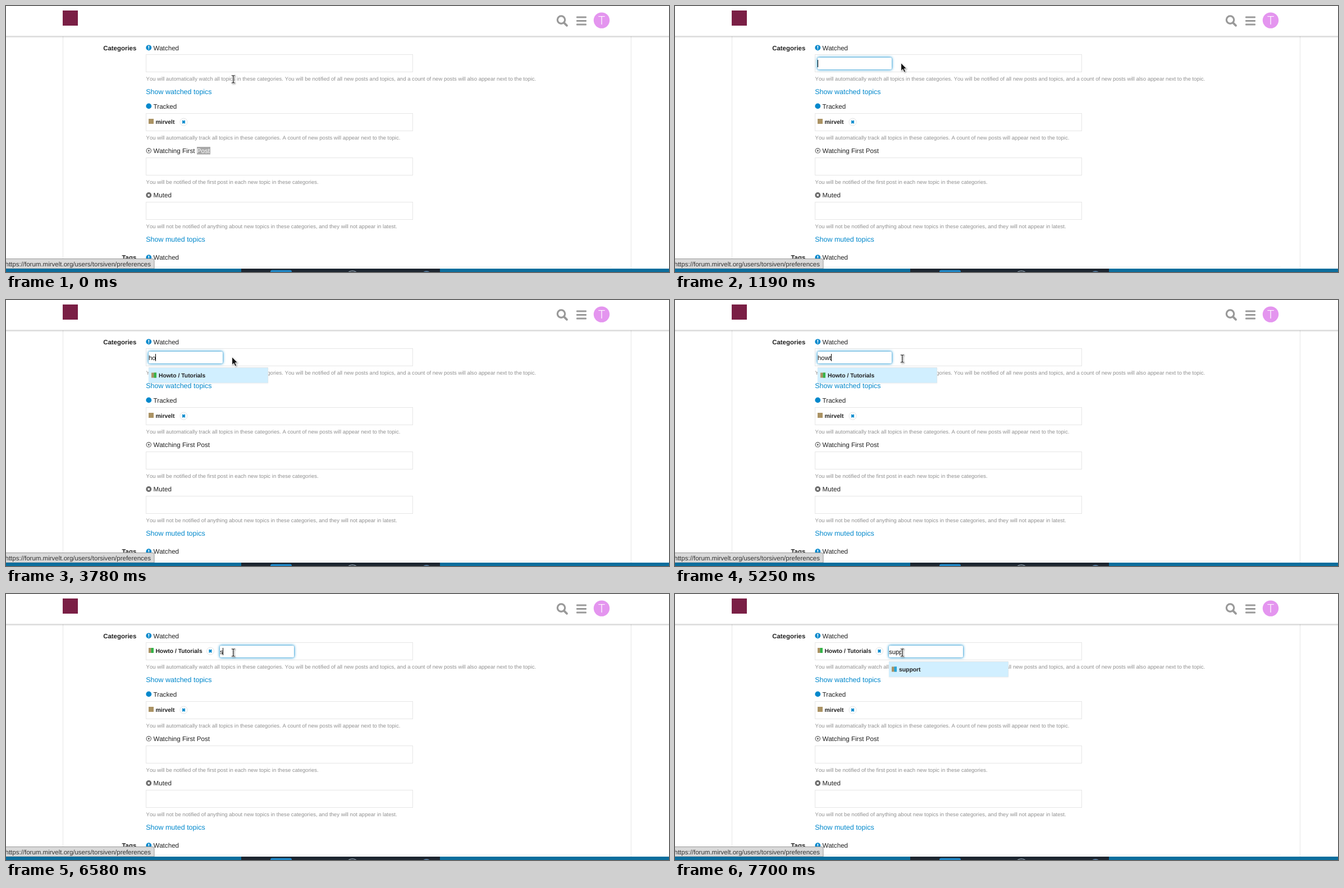
Recreate the animation shown at these times as an HTML page. Size 1181 by 474 pixels, loop 8 s.

```html
<!DOCTYPE html>
<html lang="en">
<head>
<meta charset="utf-8">
<title>Category preferences</title>
<style>
  html, body { margin: 0; width: 100%; height: 100%; overflow: hidden; background: #fff; }
  svg { display: block; width: 1181px; height: 474px; }
  text { font-family: "Liberation Sans", Arial, sans-serif; text-rendering: geometricPrecision; fill: #222; white-space: pre; }
  .label { font-size: 11.65px; }
  .head { font-size: 11.45px; font-weight: bold; text-anchor: end; }
  .hint { font-size: 9.57px; font-kerning: none; fill: #919191; }
  .link { font-size: 12.5px; fill: #08c; }
  .tag { font-size: 10.36px; font-weight: bold; }
  .typed { font-size: 11.4px; fill: #111; }
  .url { font-size: 11.5px; fill: #333; }
  .box { fill: #fff; stroke: #e6e6e6; }
  .focus { fill: #fff; filter: drop-shadow(0 0 1px rgba(0,136,204,.4)) drop-shadow(0 0 2.7px #08c); }
  .list { fill: #fff; stroke: #dfe3e5; filter: drop-shadow(0 1px 1px rgba(0,0,0,.06)); }
  .bar { fill: #fff; filter: drop-shadow(0 1.5px 1.5px rgba(0,0,0,.3)); }
</style>
</head>
<body>
<svg viewBox="0 0 1181 474"><g id="page"></g><g id="live"></g><g id="frame"></g><g id="mouse"></g></svg>
<script>
const $ = id => document.getElementById(id);
const TAN = '#ab9364', GREEN = '#35b44a', BLUE = '#25a5dc';

const rect = (x, y, w, h, fill, more = '') => `<rect x="${x}" y="${y}" width="${w}" height="${h}" fill="${fill}" ${more}/>`;
const styled = (cls, x, y, w, h, r = 0) => `<rect class="${cls}" x="${x}" y="${y}" width="${w}" height="${h}" rx="${r}"/>`;
const circle = (x, y, r, fill, more = '') => `<circle cx="${x}" cy="${y}" r="${r}" fill="${fill}" ${more}/>`;
const text = (cls, x, y, s, more = '') => `<text class="${cls}" x="${x}" y="${y}" ${more}>${s}</text>`;
const cross = (x, y, r, color, w) =>
  `<path d="M${x - r} ${y - r}l${2 * r} ${2 * r}m0 ${-2 * r}l${-2 * r} ${2 * r}" stroke="${color}" stroke-width="${w}"/>`;
const swatch = (x, y, color) => rect(x, y, 9, 9, TAN) + rect(x + 4.5, y, 4.5, 9, color);
const alertIcon = y => circle(254.3, y, 4.9, '#08c') + rect(253.5, y - 3.3, 1.7, 3.9, '#fff') + rect(253.5, y + 1.5, 1.7, 1.6, '#fff');
const field = y => styled('box', 249.5, y, 475, 31);

function chip(y, name, color, end) {
  return swatch(254, y - 5, color) + text('tag', 266.4, y + 4, name) +
    circle(end, y + .7, 6.6, '#fff', 'stroke="#e4e4e4"') + cross(end, y + .7, 2.3, '#08c', 2.4);
}

$('page').innerHTML =
  rect(101, 54, 1, 414, '#e6e6e6') + rect(1113, 54, 1, 414, '#e6e6e6') +
  text('head', 232.3, 79, 'Categories') + alertIcon(74.3) + text('label', 262.6, 79, 'Watched') + field(86.5) +
  text('hint', 249.5, 133, 'You will automatically watch all topics in these categories. You will be notified of all new posts and topics, and a count of new posts will also appear next to the topic.') +
  text('link', 249.2, 157, 'Show watched topics') +
  circle(254.3, 178.4, 4.9, '#08c') + text('label', 262.6, 183, 'Tracked') + field(191.5) +
  chip(206, 'mirvelt', TAN, 316.5) +
  text('hint', 249.5, 238, 'You will automatically track all topics in these categories. A count of new posts will appear next to the topic.') +
  circle(254.3, 257.8, 4.2, 'none', 'stroke="#666" stroke-width="1.2"') + circle(254.3, 257.8, 1.6, '#666') + field(270.5) +
  text('hint', 249.5, 317, 'You will be notified of the first post in each new topic in these categories.') +
  circle(254.3, 337, 4.9, '#666') + cross(254.3, 337, 1.7, '#fff', 1.6) + text('label', 262.6, 341, 'Muted') + field(349.5) +
  text('hint', 249.5, 396, 'You will not be notified of anything about new topics in these categories, and they will not appear in latest.') +
  text('link', 249.2, 420, 'Show muted topics') +
  text('head', 232.3, 452, 'Tags') + alertIcon(448.2) + text('label', 262.6, 452, 'Watched') +
  rect(249, 465, 830, 1, '#e6e6e6');

$('frame').innerHTML =
  styled('bar', -10, -10, 1201, 63.5) +
  rect(101, 8, 27, 27, '#7a1f45') +
  circle(989, 24.6, 6.7, 'none', 'stroke="#999" stroke-width="3.2"') +
  '<path d="M994 29.8l5 5" stroke="#999" stroke-width="3.8" stroke-linecap="round"/>' +
  [18.4, 24.9, 31.4].map(y => rect(1016, y, 18, 3.1, '#999', 'rx="1"')).join('') +
  circle(1061, 25.6, 14.2, '#e495ef') +
  text('', 1061, 33, 'T', 'text-anchor="middle" style="font:300 21px Roboto,sans-serif;fill:#fff"') +
  '<path d="M-1 450.5H261q3 0 3 3V468H-1z" fill="#d9d9d9" stroke="#9b9b9b"/>' +
  text('url', -1.5, 464, 'https://forum.mirvelt.org/users/torsiven/preferences') +
  rect(0, 468, 1181, 6, '#0b6e9d') + rect(419, 468, 354, 6, '#1d2630') +
  rect(471, 470.5, 38, 10, '#1d86c6', 'rx="3"') +
  circle(617, 483.5, 11.5, 'none', 'stroke="#8393a0" stroke-width="1.5"') +
  circle(749, 481, 9, '#53789b');

// Suggestions: name and swatch colour
const forH = [['Howto / Tutorials', GREEN], ['Change log', BLUE], ['Other things', TAN]];
const forS = [['support', BLUE], ['Discussions', GREEN], ['News', TAN], ['Services', BLUE], ['Suggestions', GREEN], ['Systems', TAN]];

// Each state holds from its time until the next: [ms, typed text, suggestions]
const first = [[1190, '', []], [3500, 'h', []], [3640, 'h', forH], [3710, 'ho', forH],
  [3780, 'ho', forH.slice(0, 1)], [4130, 'how', forH.slice(0, 1)], [4480, 'howt', forH.slice(0, 1)]];
const second = [[5320, '', []], [6510, 's', []], [6650, 's', forS], [7140, 'su', forS],
  [7210, 'su', forS.slice(0, 1)], [7490, 'sup', forS.slice(0, 1)], [7700, 'supp', forS.slice(0, 1)]];

function dropdown(x, items) {
  if (!items.length) return '';
  const row = 26.7;
  return styled('list', x + .5, 120.5, 212, items.length * row) + rect(x, 121, 212.5, row - .2, '#d1efff') +
    items.map(([name, color], i) =>
      swatch(x + 5, 129.5 + i * row, color) + text('tag', x + 18, 138 + i * row, name)).join('');
}

function live(t) {
  const selected = t < 1190, done = t >= 5320;
  let out = selected ? rect(340, 251, 24, 13.5, '#a9a9a9') : '';
  out += text('label', 262.6, 262, `Watching First <tspan ${selected ? 'fill="#fff"' : ''}>Post</tspan>`);
  if (selected) return out;
  const x = done ? 381 : 254;
  const [, typed, items] = (done ? second : first).findLast(s => t >= s[0]);
  const blink = t >= 2450 && t < 3500;
  if (done) out += chip(101, 'Howto / Tutorials', GREEN, 364);
  return out + styled('focus', x, 92, 132, 21, 2) + text('typed', x, 107, typed, 'id="typed"') +
    (blink ? '' : rect(x, 96, 1, 13, '#000', 'id="caret"')) + dropdown(x, items);
}

function mouse(t) {
  const step = Math.min(8, Math.floor(t / 70));
  const y = 130.5 - 26 * step / 8;
  if (y < 122 && t < 5250)
    return `<path transform="translate(402.6 ${y - 3})" d="M0 0V14.2l3.2-3 2.3 5.3 2.5-1.1-2.3-5.1H10z"
      fill="#111" stroke="#fff" stroke-width=".9" style="filter:drop-shadow(1px 1px 1px rgba(0,0,0,.35))"/>`;
  const d = 'M-3-6.5h2L0-5.7l1-.8h2M0-6V6M-3 6.5h2L0 5.7l1 .8h2';
  return `<g transform="translate(404.8 ${y})" fill="none" style="filter:drop-shadow(1px 1px 1px rgba(0,0,0,.35))">
    <path d="${d}" stroke="#fff" stroke-width="3"/><path d="${d}" stroke="#111" stroke-width="1.2"/></g>`;
}

const shown = {};
function update(id, markup) {
  if (shown[id] === markup) return;
  $(id).innerHTML = shown[id] = markup;
  const caret = $('caret');
  if (id === 'live' && caret) {
    const typed = $('typed');
    const width = typed.textContent ? typed.getComputedTextLength() : 0;
    caret.setAttribute('x', Math.floor(+typed.getAttribute('x') + width));
  }
}

const start = performance.now();
function tick() {
  const t = (performance.now() - start) % 8000;
  update('live', live(t));
  update('mouse', mouse(t));
  requestAnimationFrame(tick);
}
tick();
</script>
</body>
</html>
```
